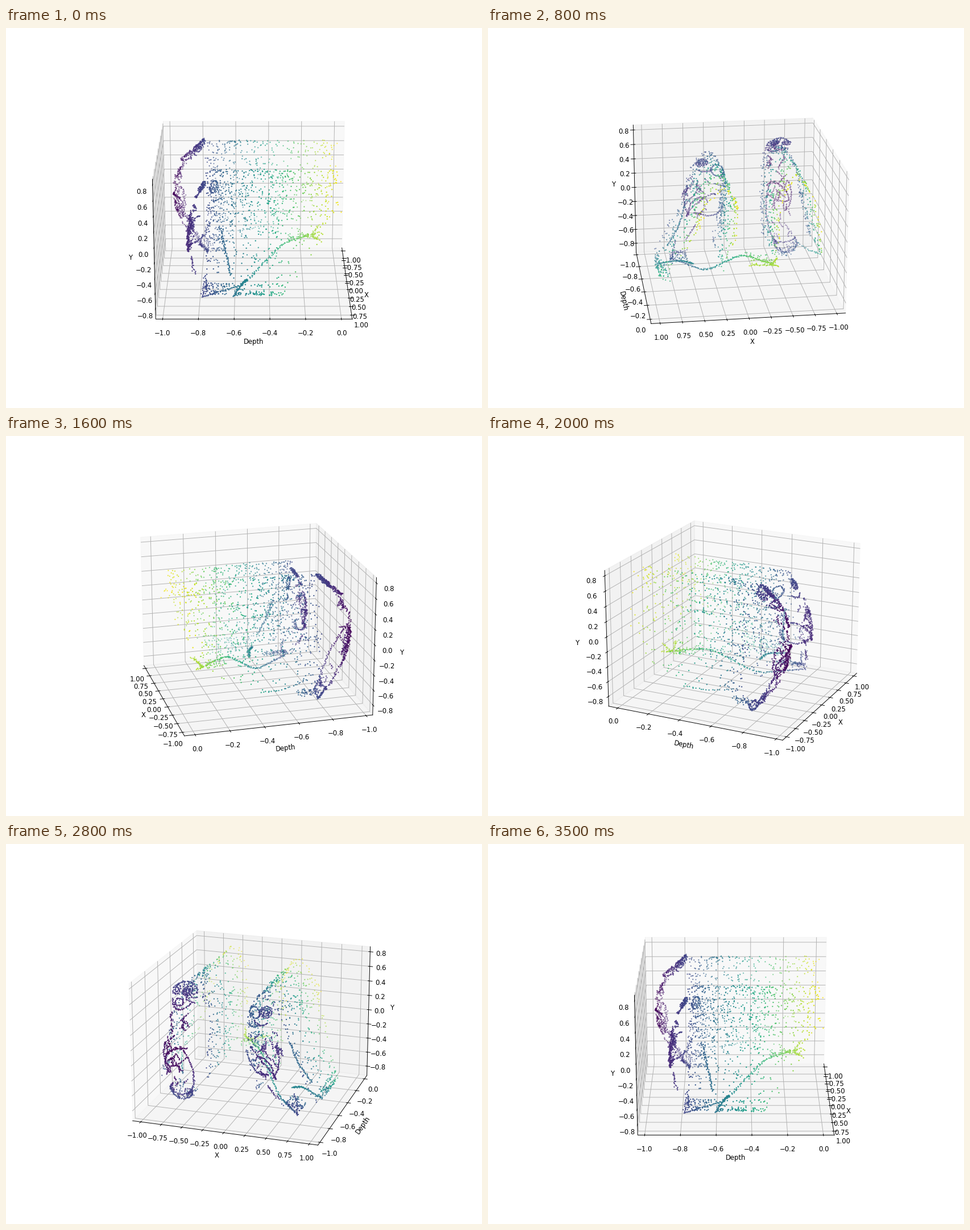
Write a matplotlib script that moves like this. It is 837 px wide and 669 px high and loops after 3600 ms.

```python
import numpy as np
import matplotlib.pyplot as plt
from matplotlib.animation import FuncAnimation

FRAMES, ELEV = 36, 20
ANGLES = np.linspace(0, 360, FRAMES)
NEAR, FAR = -0.9895, 0.0105
GAP = 0.0105                    # spacing of the dots on drawn lines
rng = np.random.default_rng(7)
cloud = []


def add(x, y, d, spread=0.004):
    pts = np.column_stack([x, d, y])
    pts += rng.normal(0, spread, pts.shape)
    pts[:, 1] = np.clip(pts[:, 1], NEAR, FAR)
    cloud.append(pts)


def smooth(keys, t):
    """Catmull-Rom curve through the key points, t in 0..1."""
    k = np.array(keys, float)
    k = np.vstack([2 * k[0] - k[1], k, 2 * k[-1] - k[-2]])
    s = t * (len(k) - 3)
    i = np.minimum(s.astype(int), len(k) - 4)
    f = (s - i)[:, None]
    a, b, c, e = (k[i + j] for j in range(4))
    return (b + f * (c - a) / 2 + f**2 * (a - 2.5 * b + 2 * c - e / 2)
            + f**3 * (1.5 * (b - c) + (e - a) / 2)).T


def line(keys, depth=None):
    """Dense line; keys are (x, y, d), or (x, y) on a depth surface."""
    size = np.hypot(*np.diff(np.array(keys)[:, :2], axis=0).T).sum()
    x, y, *d = smooth(keys, np.linspace(0, 1, max(4, int(size / GAP))))
    add(x, y, depth(x, y) if depth else d[0])


def oval(depth, cx, cy, rx, ry, start=0, end=360, tilt=0):
    sweep, tilt = np.radians([start, end]), np.radians(tilt)
    n = int((sweep[1] - sweep[0]) * (rx + ry) / 2 / GAP) + 5
    t = np.linspace(*sweep, n)
    p, q = rx * np.cos(t), ry * np.sin(t)
    x = cx + p * np.cos(tilt) - q * np.sin(tilt)
    y = cy + p * np.sin(tilt) + q * np.cos(tilt)
    add(x, y, depth(x, y))


def dashes(depth, mid, half, y0, y1, n):
    """Short, nearly upright strokes over the front of a body."""
    for _ in range(n):
        y = rng.uniform(y0, y1)
        x = mid(y) + rng.uniform(-half, half)
        line([(x, y), (x + rng.normal(0, 0.03), y - rng.uniform(0.04, 0.09))],
             depth)


def wall(keys, n, front=-0.76, back=0.0, bias=1.3):
    """Sparse dots on an outline drawn back; low parts reach less far."""
    x, y = smooth(keys, rng.random(n))
    back = back - 0.4 * np.clip(0.1 - y, 0, 1) * (back > -0.1)
    add(x, y, front + (back - front) * rng.random(n) ** bias, 0.009)


def left_mid(y):
    return -0.63 + 0.07 * y


def left_front(x, y):
    return -0.97 + 0.27 * (y - 0.05) ** 2 + 2 * (x - left_mid(y)) ** 2


def left_face(x, y):
    return -0.9 + 0.5 * np.maximum(y - 0.56, -0.05) + 0.2 * abs(x + 0.62)


def right_mid(y):
    return 0.4 - 0.2 * y


def right_front(x, y):
    return -0.87 + 0.2 * (y + 0.15) ** 2 + 1.1 * (x - right_mid(y)) ** 2


# left figure: outline, eyes, mouth, rays of the face
wall([(-0.96, -0.52), (-0.85, 0), (-0.77, 0.45), (-0.56, 0.78),
      (-0.4, 0.5), (-0.37, 0), (-0.4, -0.5)], 520)
for cx in (-0.7, -0.56):
    for r in (0.02, 0.045):
        oval(left_face, cx, 0.69, r, r)
oval(left_face, -0.625, 0.58, 0.05, 0.035)
oval(left_face, -0.6, 0.65, 0.14, 0.13, 10, 150)
oval(left_face, -0.6, 0.64, 0.13, 0.13, 200, 330)
for a in np.radians(np.arange(-20, 120, 20)):
    dx, dy = np.cos(a), np.sin(a)
    line([(-0.6 + r * dx, 0.62 + r * dy) for r in (0.04, 0.15)], left_face)

# left figure: arms, belly, feet
oval(left_front, -0.63, -0.09, 0.17, 0.09, 0, 300, 40)
oval(left_front, -0.67, -0.02, 0.1, 0.02, 0, 180, 40)
oval(left_front, -0.62, -0.1, 0.18, 0.28, 140, 235)
oval(left_front, -0.65, -0.3, 0.17, 0.42, -75, 60)
dashes(left_front, left_mid, 0.13, -0.75, 0.48, 40)
oval(left_front, -0.69, -0.68, 0.14, 0.12, 150, 370)
oval(left_front, -0.68, -0.6, 0.14, 0.1, 190, 320)
wall([(-0.8, -0.62), (-0.7, -0.76), (-0.58, -0.74)], 60, -0.79, -0.66)
line([(-0.97, -0.53, -0.4), (-0.87, -0.57, -0.53), (-0.75, -0.55, -0.68)])

# right figure: outline, eye, ear
wall([(0.21, -0.6), (0.13, 0), (0.1, 0.4), (0.25, 0.67),
      (0.46, 0.46), (0.6, 0), (0.92, -0.66)], 560)
wall([(0.14, -0.35), (0.12, 0.1), (0.11, 0.45)], 90, -0.74, -0.5)
for r in (0.02, 0.042, 0.06):
    oval(right_front, 0.33, 0.49, r * 1.15, r)
oval(right_front, 0.29, 0.4, 0.09, 0.06, 200, 330)
oval(lambda x, y: -0.72 - 0.3 * (x - 0.16), 0.16, 0.42, 0.07, 0.075)
line([(0.05, 0.23, -0.68), (0.12, 0.22, -0.71), (0.2, 0.24, -0.73)])

# right figure: arms, belly, feet
oval(right_front, 0.3, -0.27, 0.18, 0.23, 0, 95)
oval(right_front, 0.3, -0.06, 0.21, 0.22, 180, 300)
oval(right_front, 0.36, -0.08, 0.17, 0.28, -50, 45)
oval(right_front, 0.33, -0.14, 0.24, 0.04, 0, 180, -45)
dashes(right_front, right_mid, 0.15, -0.3, 0.3, 24)
line([(0.4, -0.42), (0.45, -0.5), (0.52, -0.6)], right_front)
line([(0.55, 0.05, -0.68), (0.64, -0.25, -0.65), (0.78, -0.5, -0.62)])
wall([(0.52, -0.72), (0.65, -0.72), (0.74, -0.78)], 80, -0.78, -0.63)
line([(0.66, -0.56, -0.77), (0.69, -0.69, -0.76), (0.7, -0.8, -0.78)])
wall([(0.8, -0.74), (0.93, -0.68), (0.9, -0.55)], 85, -0.6, -0.33)
for _ in range(2):
    line([(0.5, -0.69, -0.53), (0.65, -0.66, -0.55), (0.9, -0.73, -0.605)])

# ground line: a soft step down while it comes forward
x = np.linspace(-0.38, 0.72, 170)
t = np.clip((x + 0.1) / 0.52, 0, 1)
add(x, -0.41 - 0.41 * t * t * (3 - 2 * t), -0.1 - 0.62 * (x + 0.38))
line([(-0.36, -0.3, -0.1), (-0.3, -0.42, -0.14), (-0.05, -0.38, -0.11)])
wall([(-0.35, -0.42), (-0.2, -0.4), (-0.05, -0.36)], 45, -0.28, -0.11)

fig = plt.figure(figsize=(10, 7.993), dpi=83.7)
ax = fig.add_subplot(projection="3d")
ax.set_xticks(np.linspace(-1, 1, 9))
ax.set_yticks(np.linspace(-1, 0, 6))
ax.set_zticks(np.linspace(-0.8, 0.8, 9))
x, d, y = np.vstack(cloud).T
ax.scatter(x, d, y, c=d, cmap="viridis", vmin=NEAR, vmax=FAR, s=1)
ax.set(xlim=(-1.1, 1.1), ylim=(NEAR - 0.05, FAR + 0.05), zlim=(-0.933, 0.869),
       xlabel="X", ylabel="Depth", zlabel="Y")


def update(i):
    ax.view_init(ELEV, ANGLES[i])
    return ()


anim = FuncAnimation(fig, update, frames=FRAMES, interval=100, repeat=True,
                     repeat_delay=0, blit=False)
plt.show()
```
